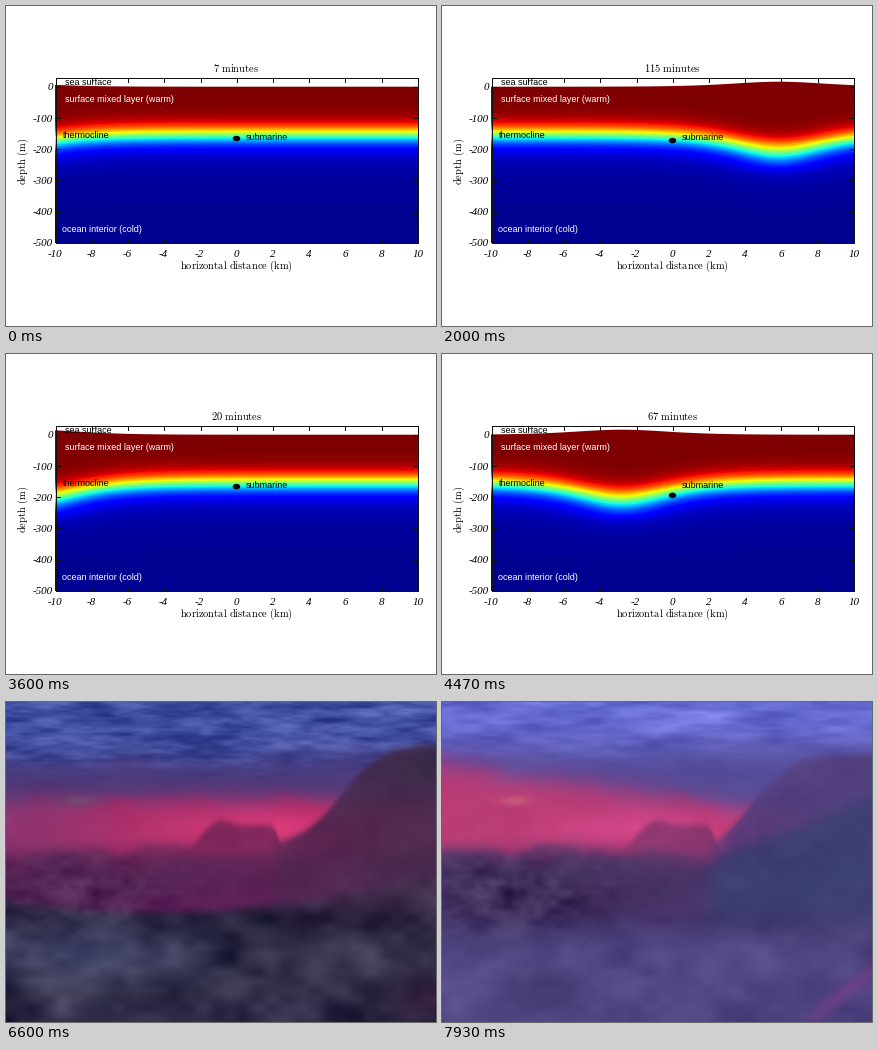
Recreate the animation shown at these times as a matplotlib script. Size 430 px wide and 320 px high, loop 8 s.

```python
import numpy as np
import matplotlib.pyplot as plt
from matplotlib.animation import FuncAnimation
from matplotlib.patches import Ellipse

W, H, DPI = 430, 320, 100
FRAMES, LOOP = 120, 8000
CUT = 99                            # first frame of the underwater shot
L, R, T, B = 49, 412, 71, 237       # plot box in pixels
INK = "#111111"
plt.rcParams["mathtext.fontset"] = "cm"

fig = plt.figure(figsize=(W / DPI, H / DPI), dpi=DPI, facecolor="white")
ax = fig.add_axes([0, 0, 1, 1])
ax.axis("off")


def pt(px):
    return px * 72 / DPI


def tex(s):
    return r"$\mathrm{%s}$" % s.replace(" ", r"\ ")


def roman(x, y, s, **kw):
    return ax.text(x, y, tex(s), size=pt(10.5), color="black", ha="center", **kw)


def sans(x, y, s, color):
    ax.text(x, y, s, color=color, family="Liberation Sans", size=pt(9), va="baseline")


def number(x, y, k, ha):
    ax.text(x, y, str(k), family="Liberation Serif", style="italic",
            size=pt(11), ha=ha, va="baseline")


def line(xs, ys):
    ax.plot(xs, ys, color=INK, lw=pt(1))


# ---- internal wave plot ----

def px_x(km):
    return 230.7 + km * 18.1


def px_y(z):
    return 80.7 - z * 0.312


def step(d, soft=1):
    return 1 / (1 + np.exp(-np.clip(d / soft, -40, 40)))


def warmth(z):
    """Temperature at rest: a sharp thermocline with a faint tail below."""
    core = 0.5 + 0.5 * np.tanh((z + 152) / 36)
    tail = 0.015 + 0.05 * np.exp(np.minimum(z + 200, 0) / 70)
    return core + tail * (1 - core)


def minutes(n):
    return (6.8 + 3.62 * n) % 181.9


def bump(x, m):
    return 1 / np.cosh((x - 0.181 * (m - 83)) / 3.5) ** 2


km = (np.arange(L, R) + 0.5 - px_x(0)) / 18.1
z = ((px_y(0) - np.arange(T, B) - 0.5) / 0.312)[:, None]
stretch = (1 + 0.3 * np.clip((-z - 180) / 80, 0, 1)) * np.clip((z + 500) / 250, 0, 1)
jet = plt.get_cmap("jet")


def ocean(m):
    s = bump(km, m)[None, :]
    img = jet(warmth(z + 50 * s * stretch))[..., :3]
    air = np.clip((z - 16 * s) * 0.312 + 0.5, 0, 1)[..., None]
    return img * (1 - air) + air


field = ax.imshow(ocean(0), extent=(L, R, B, T), interpolation="nearest", aspect="auto")
x0, x1, y0, y1 = L + 0.5, R - 0.5, T + 0.5, B - 0.5
line([x0, x1, x1, x0, x0], [y0, y0, y1, y1, y0])
for k in range(-10, 11, 2):
    x = px_x(k)
    line([x, x], [y0, y0 + 4])
    line([x, x], [y1, y1 - 4])
    number(x - (k < 0), 250.7, k, "center")
for k in range(-500, 1, 100):
    y = px_y(k)
    line([x0, x0 + 4], [y, y])
    line([x1, x1 - 4], [y, y])
    number(47, y + 3.6, k, "right")

title = roman(230.5, 66.5, "7 minutes", va="baseline")
roman(230.5, 262.5, "horizontal distance (km)", va="baseline")
roman(17.5, 155, "depth (m)", va="center", rotation=90)
sans(59, 79, "sea surface", "black")
sans(59, 96, "surface mixed layer (warm)", "white")
sans(57, 131.5, "thermocline", "black")
sans(240, 134.5, "submarine", "black")
sans(56, 225.5, "ocean interior (cold)", "white")
sub = ax.add_patch(Ellipse((230.5, 132.5), 7.5, 5.5, color="black", lw=0, zorder=4))


# ---- underwater shot ----

X, Y = np.meshgrid(np.arange(W) + 0.5, np.arange(H) + 0.5)
PAD = 60


def noise(seed, cx, cy, octaves=3):
    """Smooth value noise with cells of cx by cy pixels, wider than the stage."""
    rng = np.random.default_rng(seed)
    w, total = W + PAD, 0
    for o in range(octaves):
        f = 2 ** o
        u, v = np.arange(w) * f / cx, np.arange(H) * f / cy
        i, j = u.astype(int), v.astype(int)
        g = rng.uniform(-1, 1, (j[-1] + 2, i[-1] + 2))
        fu, fv = u - i, (v - j)[:, None]
        fu, fv = fu * fu * (3 - 2 * fu), fv * fv * (3 - 2 * fv)
        rows = g[:, i] * (1 - fu) + g[:, i + 1] * fu
        total = total + (rows[j] * (1 - fv) + rows[j + 1] * fv) * 0.65 ** o
    return total


ripples, clouds = noise(1, 40, 9), noise(3, 60, 13)
rocks, smoke = noise(5, 30, 20), noise(7, 56, 36)


def pan(a, p, dist):
    k = int(round(p * dist))
    return a[:, k:k + W]


def blob(cx, cy, rx, ry):
    return np.exp(-((X - cx) / rx) ** 2 - ((Y - cy) / ry) ** 2)


def over(img, color, mask):
    return img + (np.asarray(color, float) - img) * mask[..., None]


def scene(p):
    """Dusk view at p = 0 dissolving into the hazy view at p = 1."""
    def mix(a, b):
        return np.asarray(a) * (1 - p) + np.asarray(b) * p

    q = 1 - p
    s, r = pan(smoke, p, 45), pan(rocks, p, 25)
    wave = q * pan(ripples, p, 40) + p * pan(clouds, p, 30)

    # water surface, haze and the glow under it
    img = np.ones((H, W, 3)) * mix((64, 78, 160), (104, 108, 214))
    img += (wave * 22)[..., None]
    img = over(img, mix((76, 58, 122), (84, 76, 152)), step(Y - mix(58, 45) + 5 * s, mix(7, 10)))
    edge = mix(98, 62 + 0.15 * X) + 4 * s
    glow = step(Y - edge, mix(6, 7)) * mix(0.62 + 0.38 * step(X - 90, 30), 0.95)
    img = over(img, mix((186, 50, 108), (196, 62, 118)), glow)
    img = over(img, mix((228, 60, 126), (218, 72, 142)), 0.8 * blob(mix(275, 200), 128, 90, 18))

    # land below the glow, with a flat-topped butte
    land = step(Y - 150 + 6 * s, 5)
    img = over(img, mix((92, 36, 86), (74, 54, 106)), land)
    top = 152 - 29 * (step(X - 192, 6) - step(X - 273, 2.5)) - 5 * blob(215, 0, 12, 1e4)
    img = over(img, mix((98, 32, 80), (120, 52, 108)), 0.75 * step(Y - top, 2) * step(X - 165, 8) * (1 - land))

    # sea floor
    rim = mix(211 - 12 * ((X - 150) / 150) ** 2, 222)
    floor = step(Y - rim, mix(2.5, 9))
    img = over(img, (118, 32, 106), q * 0.5 * (1 - floor) * step(Y - rim + 14, 4) * blob(190, 210, 120, 60))
    img = over(img, mix((44, 42, 68), (80, 70, 132)), floor)
    img = over(img, mix((76, 82, 122), (86, 78, 142)), 0.6 * floor * blob(80, 250, 110, 32))
    img = over(img, mix((74, 40, 74), (88, 74, 142)), 0.5 * floor * blob(425, 300, 40, 30))
    img = over(img, (62, 54, 102), p * 0.7 * blob(95, 285, 32, 24))

    # slope on the right, then the blue reef that covers it
    crest = mix(42, 52) + 103 * step(mix(335, 308) - X, 21)
    slope = step(Y - crest, 2) * step(X - 275, 6) * step(mix(205, 230) - Y, 14)
    img = over(img, mix((70, 42, 78), (84, 64, 128)), slope * 0.9)
    img = over(img, (104, 36, 88), q * 0.5 * slope * blob(310, 150, 50, 40))
    img = over(img, (48, 38, 64), q * 0.7 * slope * blob(425, 60, 60, 25))
    reef = step(Y - 150 + 0.39 * (X - 290), 4) * step(X - 268, 8) * step(226 - Y, 9)
    img = over(img, (54, 62, 110), p * 0.85 * reef)

    # rocks and drifting silt
    left = land * blob(70, 190, 100, 45)
    img = over(img, (48, 36, 72), left * mix(0.3, 0.6))
    img += (left * r * mix(16, 20) + floor * s * mix(15, 5) + 4 * s)[..., None]

    # pale disc in the haze and a pink streak in the corner
    img = over(img, mix((110, 84, 112), (212, 104, 126)), 0.7 * blob(73, 99, 16, 5))
    streak = np.exp(-((Y - 320 + (X - 365) * 0.77) / 9) ** 2) * step(X - 365, 8)
    img = over(img, (124, 62, 136), p * 0.6 * streak)
    return np.clip(img, 0, 255).astype(np.uint8)


shot = ax.imshow(np.zeros((H, W, 3), np.uint8), extent=(0, W, H, 0),
                 interpolation="nearest", aspect="auto", zorder=10)
ax.set_xlim(0, W)
ax.set_ylim(H, 0)


def draw(n):
    under = n >= CUT
    shot.set_visible(under)
    if under:
        shot.set_data(scene((n - CUT) / (FRAMES - 1 - CUT)))
    else:
        m = minutes(n)
        field.set_data(ocean(m))
        title.set_text(tex("%d minutes" % round(m)))
        sub.set_center((230.5, 132.5 + 16 * bump(0, m)))
    return field, title, sub, shot


anim = FuncAnimation(fig, draw, frames=FRAMES, init_func=lambda: draw(0),
                     interval=LOOP / FRAMES, repeat=True, repeat_delay=0)
plt.show()
```
